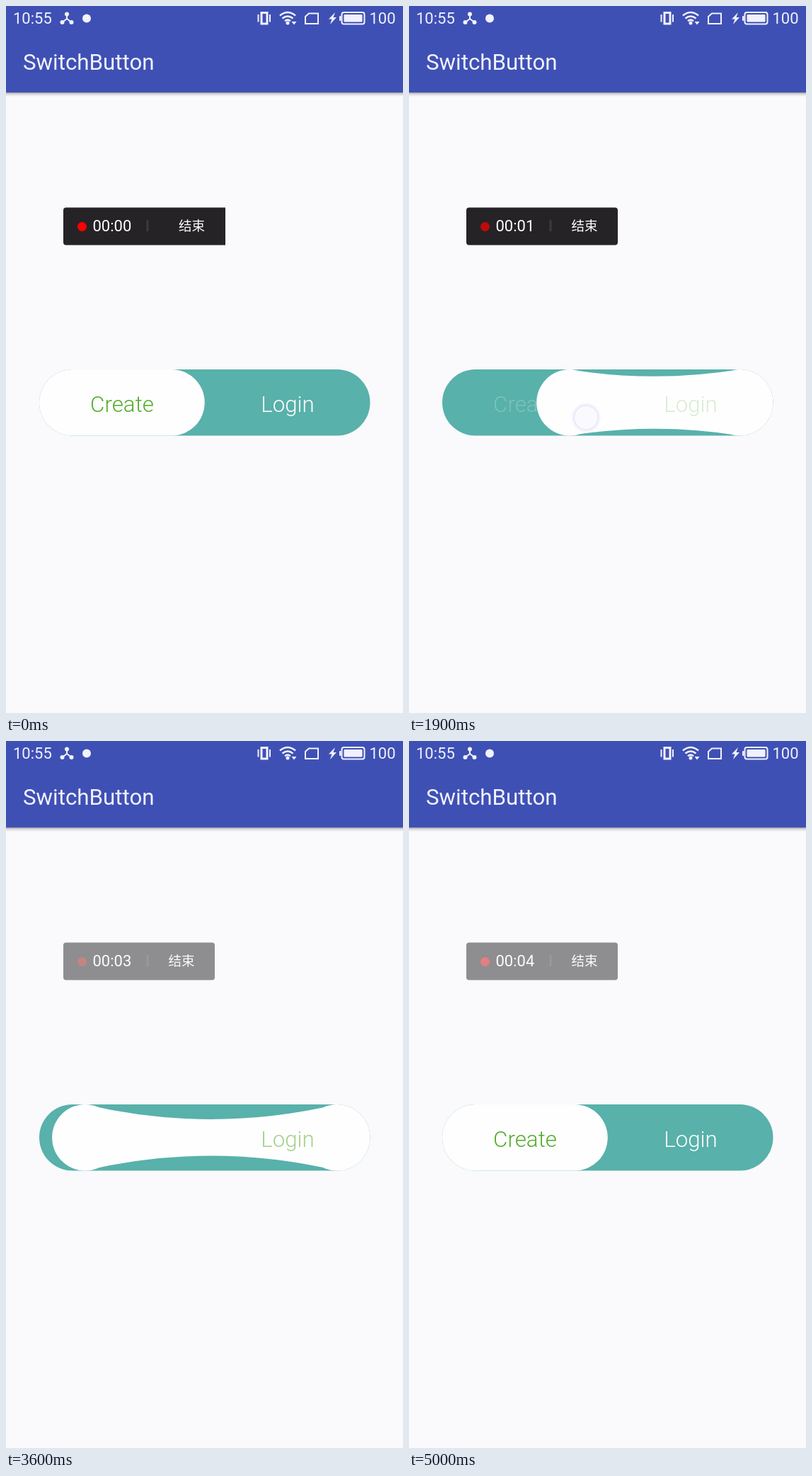
An HTML page that plays this animation: 561 by 998 pixels, repeating every 5.1 s.

```html
<!DOCTYPE html>
<html lang="en">
<head>
<meta charset="utf-8">
<title>Switch button</title>
<style>
  html, body { margin: 0; width: 100%; height: 100%; overflow: hidden; background: #faf9fc; }
  svg { display: block; width: 561px; height: 998px; font-family: Roboto, sans-serif; }
  .label { font-size: 31.3px; font-weight: 300; text-anchor: middle; }
  .small { font-size: 22px; }
  .cjk { font: 18.5px "Noto Sans CJK SC", "Noto Sans CJK", sans-serif; }
</style>
</head>
<body>
<svg viewBox="0 0 561 998">
  <defs>
    <linearGradient id="shade" x2="0" y2="1">
      <stop stop-color="#000" stop-opacity=".38"/>
      <stop offset=".4" stop-color="#000" stop-opacity=".13"/>
      <stop offset="1" stop-color="#000" stop-opacity="0"/>
    </linearGradient>
  </defs>
  <rect width="561" height="122" fill="#3f50b5"/>
  <rect y="122" width="561" height="6" fill="url(#shade)"/>

  <g fill="#f1f2fb">
    <text class="small" x="10" y="25">10:55</text>
    <text class="small" x="513.5" y="25">100</text>
    <text x="24" y="90" font-size="31.3">SwitchButton</text>
    <circle cx="86" cy="11.5" r="3"/>
    <circle cx="79.5" cy="23" r="3"/>
    <circle cx="92.5" cy="23" r="3"/>
    <circle cx="114" cy="17.5" r="6"/>
    <path d="M465 9 456 18.5h4.5L458 26l9-10h-4.5z"/>
    <rect x="477.5" y="12" width="26" height="10.5" rx="1"/>
    <rect x="471" y="14" width="2.5" height="7" rx="1"/>
    <path d="M403.5 22h7l-3.5 4.5z"/>
    <circle cx="398" cy="24" r="2.5"/>
  </g>
  <g fill="none" stroke="#f1f2fb" stroke-width="2">
    <path d="M86 11V18L79.5 23M86 18l6.500 5"/>
    <rect x="361" y="9.500" width="8" height="15.500" stroke-width="3"/>
    <path d="M356.500 12v10.500M373 12v10.500"/>
    <path d="M387 13.500q11-9 22 0M390.500 17.500q7.500-6 15 0M394 21.200q4-3.200 8 0" stroke-width="2.500"/>
    <path d="M428 10.500h13V25H423V15z"/>
    <rect x="474.500" y="9" width="32" height="16.500" rx="3"/>
  </g>

  <g id="recorder">
    <path id="panel" fill="#252326"/>
    <circle id="dot" cx="107.500" cy="311.500" r="6.500" fill="#f00"/>
    <text id="clock" class="small" x="122.500" y="318" fill="#fff"></text>
    <rect x="198.500" y="302" width="3" height="16" fill="#3d3b3e"/>
    <text id="stop" class="cjk" y="317" fill="#fff">结束</text>
  </g>

  <rect x="47" y="513" width="467.500" height="93.500" rx="46.750" fill="#58b1aa"/>
  <path id="thumb" fill="#fefeff"/>
  <text id="create" class="label" x="164" y="572.500">Create</text>
  <text id="login" class="label" x="398" y="572.500">Login</text>
  <g id="touch">
    <circle r="20.500" fill="#8f98dc" fill-opacity=".2"/>
    <circle r="17" fill="#fff" fill-opacity=".5" stroke="#8f9ad8" stroke-opacity=".5" stroke-width="1.500"/>
  </g>
</svg>
<script>
const LOOP = 5100, STEP = 100, SETTLE = 380;
const LEFT = 47, RIGHT = 514.5, HALF = (RIGHT - LEFT) / 2;
const TOP = 513, BOTTOM = 606.5, R = (BOTTOM - TOP) / 2;

// Drags: press and move times, sides, finger offset from the leading edge.
const drags = [
  { press: 880, start: 935, span: 300, from: 0, dx: -64, y: 569 },
  { press: 1700, start: 1771, span: 300, from: 1, dx: 70, y: 581 },
  { press: 3000, start: 3225, span: 360, from: 0, dx: -1, y: 566, pressY: 586 },
  { press: 4050, start: 4097, span: 300, from: 1, dx: -10, y: 582 }
];

const $ = id => document.getElementById(id);
const clamp = v => Math.min(1, Math.max(0, v));
const set = (id, attrs) => {
  for (const name in attrs) $(id).setAttribute(name, attrs[name]);
};

// Two round ends joined by a bridge that thins as it stretches.
function thumbPath(left, right) {
  const a = left + R, b = right - R, mid = (a + b) / 2;
  const dip = Math.max(0, right - left - HALF) * 0.194;
  const cap = x => `M${x - R} ${TOP + R}a${R} ${R} 0 1 1 ${2 * R} 0a${R} ${R} 0 1 1 ${-2 * R} 0z`;
  return cap(a) + cap(b) +
    `M${a} ${TOP}Q${mid} ${TOP + dip} ${b} ${TOP}V${BOTTOM}Q${mid} ${BOTTOM - dip} ${a} ${BOTTOM}z`;
}

function drawSwitch(t) {
  const drag = drags.filter(d => t >= d.press).pop();
  let left = LEFT, right = LEFT + HALF, alpha = 1, active = 0, touch = 0;
  if (drag) {
    const { press, start, span, from, dx, y, pressY = y } = drag;
    const lead = clamp((t - start) / span);
    const tail = 1 - (1 - clamp((t - start - span) / SETTLE)) ** 2;
    left += HALF * (from ? 1 - lead : tail);
    right += HALF * (from ? 1 - tail : lead);
    alpha = (lead + tail) / 2;
    active = lead < 1 ? from : 1 - from;
    touch = lead < 1 ? Math.max(0.25, 1 - 1.4 * lead) : 0;
    const lift = clamp((t - press) / (start - press));
    const x = (from ? left : right) + dx;
    set("touch", { transform: `translate(${x} ${pressY + (y - pressY) * lift})` });
  }
  set("thumb", { d: thumbPath(left, right) });
  set("touch", { opacity: touch });
  ["create", "login"].forEach((id, side) =>
    set(id, { fill: side === active ? "#55ad2b" : "#fff", opacity: alpha }));
}

function drawRecorder(t) {
  const wide = t < 100;
  const edge = wide ? 310 : 295;
  const corner = wide ? 0 : 4;
  set("panel", {
    d: `M85 284.500H${edge - corner}q${corner} 0 ${corner} ${corner}V${337.5 - corner}` +
      `q0 ${corner} ${-corner} ${corner}H85q-4 0-4-4V288.500q0-4 4-4z`
  });
  set("stop", { x: wide ? 244 : 229.5 });
  set("dot", { opacity: wide ? 1 : 0.65 + 0.17 * Math.cos((t - 100) / 500 * Math.PI) });
  set("recorder", { opacity: 1 - 0.5 * clamp((t - 3100) / 400) });
  $("clock").textContent = "00:0" + Math.max(0, Math.floor((t - 200) / 1000));
}

function frame(now) {
  const t = Math.floor(now % LOOP / STEP) * STEP;
  drawSwitch(t);
  drawRecorder(t);
  requestAnimationFrame(frame);
}
frame(0);
</script>
</body>
</html>
```
